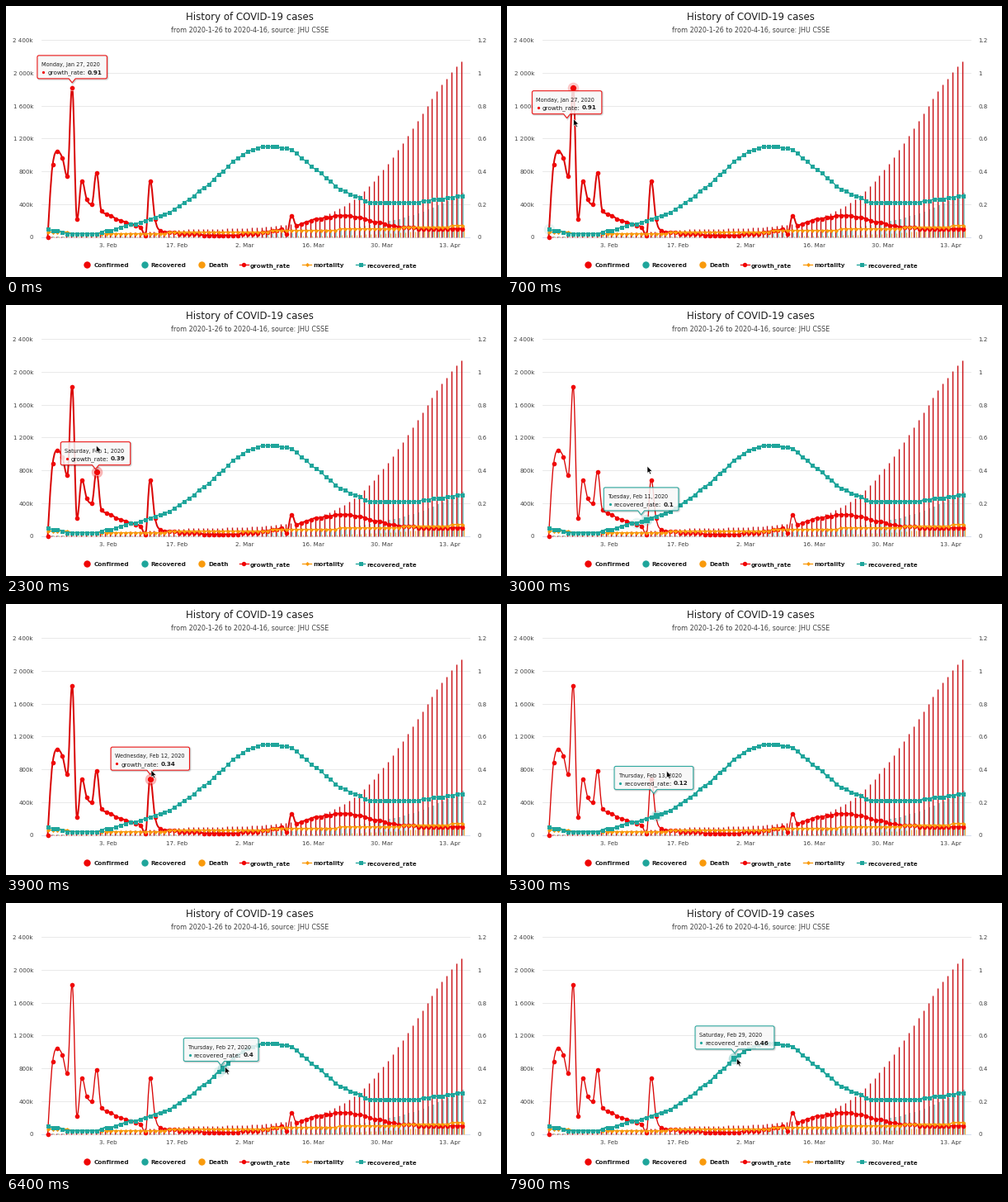
Animation of 600 by 328 pixels, one loop 8 s. Source, as a matplotlib script:

```python
import numpy as np
import matplotlib.pyplot as plt
from matplotlib.animation import FuncAnimation
from matplotlib.patches import PathPatch, Polygon
from matplotlib.path import Path

W, H, DPI = 600, 328, 64
PT = 72 / DPI                      # points per pixel
STEP, COUNT = 100, 80
RED, TEAL, ORANGE = "#f00505", "#1fa59b", "#f99a0c"
plt.rcParams["font.family"] = "DejaVu Sans"

fig = plt.figure(figsize=(W / DPI, H / DPI), dpi=DPI, facecolor="white")
ax = fig.add_axes([0, 0, 1, 1])
ax.set_xlim(0, W)
ax.set_ylim(H, 0)
ax.axis("off")

# ---------- data, one value per day from 22 January ----------
DAYS = np.arange(86)
LEFT, DAY_W = 50.6, 5.912
X = LEFT + DAY_W * DAYS
BASE, UNIT = 279.5, 198.7          # y of zero, pixels per 1.0 (or 2000k)


def ypos(v):
    return BASE - UNIT * np.asarray(v)


def logistic(mid, scale):
    return 1 / (1 + np.exp((mid - DAYS) / scale))


# decaying start, a second hump in late March, and a few outlier days
growth = (.6 * np.exp(-DAYS / 8.3) + .05 * logistic(45, 4)
          + .08 * np.exp(-((DAYS - 60) / 9) ** 2))
for day, value in {0: 0, 1: .44, 2: .52, 3: .48, 5: .91, 6: .11, 7: .34, 10: .39,
                   20: .01, 21: .34, 22: .11, 49: .02, 50: .13}.items():
    growth[day] = value
growth = growth.round(2)

KEYS = [(0, 5), (4, 2), (10, 2), (20, 10), (25, 15), (30, 25), (36, 40), (38, 46),
        (41, 52), (44, 55), (47, 55), (50, 53), (60, 29), (66, 21), (75, 21), (85, 25)]
recovery = np.interp(DAYS, *zip(*KEYS)).round() / 100
mortality = (.02 + .047 * (DAYS / 85) ** 1.8 + .01 * (DAYS < 5)).round(2)

# counts in millions
confirmed = .09 * np.clip(DAYS / 30, 0, 1) + 2.6 * logistic(75.7, 7.1)
recovered = .54 * np.exp((DAYS - 85) / 14.5)
deaths = .142 * np.exp((DAYS - 85) / 13)


# ---------- helpers ----------
def text(x, y, s, size, color="#1c1c1c", ha="center", **kw):
    return ax.text(x, y, s, fontsize=size * PT, color=color, ha=ha,
                   va="center_baseline", **kw)


def spline(x, y):
    """Smooth curve through the points without overshoot."""
    verts, codes = [(x[0], y[0])], [Path.MOVETO]
    handle = verts[0]
    for i in range(1, len(x)):
        left = right = (x[i], y[i])
        if i < len(x) - 1:
            lx, ly = (1.5 * x[i] + x[i - 1]) / 2.5, (1.5 * y[i] + y[i - 1]) / 2.5
            rx, ry = (1.5 * x[i] + x[i + 1]) / 2.5, (1.5 * y[i] + y[i + 1]) / 2.5
            shift = (ry - ly) * (rx - x[i]) / (rx - lx) + y[i] - ry
            ly = np.clip(ly + shift, *sorted((y[i - 1], y[i])))
            ry = np.clip(2 * y[i] - ly, *sorted((y[i + 1], y[i])))
            left, right = (lx, 2 * y[i] - ry), (rx, ry)
        verts += [handle, left, (x[i], y[i])]
        codes += [Path.CURVE4] * 3
        handle = right
    return Path(verts, codes)


def series(values, color, marker, size, z, line_color=None):
    y = ypos(values)
    line = PathPatch(spline(X, y), fc="none", ec=line_color or color, lw=1.33 * PT,
                     capstyle="round", joinstyle="round", zorder=z)
    ax.add_patch(line)
    ax.plot(X, y, marker, color=color, ms=size * PT, mew=0, zorder=z + .1)
    return line


def bars(values, dx, color, w):
    ax.vlines(X + dx, BASE, ypos(values / 2), color=color, lw=w * PT, zorder=2)


# ---------- static chart ----------
text(295.5, 12.5, "History of COVID-19 cases", 11.8)
text(295.5, 28.5, "from 2020-1-26 to 2020-4-16, source: JHU CSSE", 8.05, "#404040")

for i in range(7):
    y = ypos(.2 * i)
    ax.plot([43, 562], [y, y], color="#ccd6eb" if i == 0 else "#e4e4e4",
            lw=.8 * PT, zorder=1)
    count = f"{400 * i:,}k".replace(",", " ") if i else "0"
    text(33, y + .5, count, 7.1, "#404040", "right")
    text(571, y + .5, f"{round(.2 * i, 1):g}", 7.1, "#404040", "left")
for i, label in enumerate(["3. Feb", "17. Feb", "2. Mar", "16. Mar", "30. Mar", "13. Apr"]):
    text(124 + 82.8 * i, 289.5, label, 7.1, "#404040")

bars(recovered, .4, "#8ccbc8", 1.8)
bars(confirmed, -1.2, "#c90d12", 1.4)
bars(deaths, 1.5, "#f7b04a", 1.2)

lines = {"growth_rate": series(growth, RED, "o", 5.6, 3, "#d90606")}
series(mortality, ORANGE, "D", 3.6, 4)
lines["recovered_rate"] = series(recovery, TEAL, "s", 5, 5)

for x, label, color in [(98, "Confirmed", RED), (167.5, "Recovered", TEAL),
                        (237, "Death", ORANGE)]:
    ax.plot(x, 313, "o", color=color, ms=8.4 * PT, mew=0)
    text(x + 8.2, 313.5, label, 7.3, ha="left", weight="bold")
for x, label, color, marker, size in [(288, "growth_rate", RED, "o", 5.4),
                                      (364.5, "mortality", ORANGE, "D", 3.6),
                                      (429.5, "recovered_rate", TEAL, "s", 5)]:
    ax.plot([x - 5.5, x + 5.5], [313, 313], color=color, lw=1.33 * PT)
    ax.plot(x, 313, marker, color=color, ms=size * PT, mew=0)
    text(x + 8, 313.5, label, 7.1, ha="left", weight="bold")

# ---------- mouse path (ms, x, y); hovering follows from it ----------
MOUSE = [(30, 80, 135), (60, 48, 232), (470, 48, 225), (500, 80.5, 135),
         (1800, 82, 146), (2016, 106.8, 166), (2300, 109.5, 170), (2680, 131, 185),
         (2795, 166, 194), (3000, 170, 195), (3300, 175, 198), (3900, 176, 201),
         (4100, 169, 202), (4700, 174.5, 200), (5100, 174.5, 200), (5300, 193.5, 202),
         (5500, 198, 215), (5800, 228, 216), (6200, 260.5, 203), (6400, 265.5, 198),
         (7050, 314, 174), (7250, 314, 174), (7600, 275, 189), (7900, 278.5, 188)]
LAG, TICK = 110, 10
VALUES = {"growth_rate": growth, "recovered_rate": recovery}
COLORS = {"growth_rate": RED, "recovered_rate": TEAL}


def mouse(t):
    times, xs, ys = zip(*MOUSE)
    return np.array([np.interp(t, times, xs), np.interp(t, times, ys)])


def hover(t):
    """Day under the mouse a moment ago, and the series nearest to it."""
    mx, my = mouse(t - LAG)
    d = int(np.clip(round((mx - LEFT) / DAY_W), 0, 85))
    return min(VALUES, key=lambda n: abs(ypos(VALUES[n][d]) - my)), d


def point(name, d):
    return np.array([X[d], ypos(VALUES[name][d])])


# the tooltip closes 1/3 of its gap to the hovered point every 32 ms
anchors = [point(*hover(0))]
for t in range(TICK, STEP * COUNT, TICK):
    goal = point(*hover(t))
    anchors.append(goal + (anchors[-1] - goal) * (2 / 3) ** (TICK / 32))


def date_label(d):
    week = "Wednesday Thursday Friday Saturday Sunday Monday Tuesday".split()
    day, month = 22 + d, "Jan"
    for length, following in ((31, "Feb"), (29, "Mar")):
        if day > length:
            day, month = day - length, following
    return f"{week[d % 7]}, {month} {day}, 2020"


def callout(cx, top, w, h=28, r=2, arrow=4):
    l, rt, b = cx - w / 2, cx + w / 2, top + h
    M, L, C = Path.MOVETO, Path.LINETO, Path.CURVE3
    parts = [(M, l + r, top), (L, rt - r, top), (C, rt, top), (C, rt, top + r),
             (L, rt, b - r), (C, rt, b), (C, rt - r, b), (L, cx + arrow, b),
             (L, cx, b + 5), (L, cx - arrow, b), (L, l + r, b), (C, l, b),
             (C, l, b - r), (L, l, top + r), (C, l, top), (C, l + r, top),
             (Path.CLOSEPOLY, l + r, top)]
    return Path([p[1:] for p in parts], [p[0] for p in parts])


# ---------- moving parts ----------
halos = [ax.plot([], [], "o", ms=13.6 * PT, mew=0, alpha=a, zorder=4.5)[0]
         for a in (.22, .1)]
dot = ax.plot([], [], "o", mec="white", mew=.5 * PT, zorder=4.6)[0]
blank = Path([(0, 0), (1, 1)])
shadows = [PathPatch(blank, fc="none", ec="black", alpha=a, lw=w * PT, zorder=7)
           for w, a in ((3.3, .05), (2, .08), (.8, .12))]
box = PathPatch(blank, fc=(.97, .97, .97, .85), lw=PT, zorder=8)
for patch in shadows + [box]:
    ax.add_patch(patch)
head = text(0, 0, "", 6.5, ha="left", zorder=9)
name_text = text(0, 0, "", 7.2, ha="left", zorder=9)
value_text = text(0, 0, "", 7.2, ha="left", weight="bold", zorder=9)
bullet = ax.plot([], [], "o", ms=3.2 * PT, mew=0, zorder=9)[0]
ARROW = np.array([(0, 0), (0, 8.6), (1.9, 6.9), (3.3, 10), (4.7, 9.4), (3.4, 6.4), (6, 6.2)])
pointer = Polygon(ARROW, fc="black", ec="white", lw=.6 * PT, zorder=10)
ax.add_patch(pointer)


def width(artist):
    return artist.get_window_extent().width * W / fig.bbox.width


def draw(frame):
    t = frame * STEP
    name, d = hover(t)
    color = COLORS[name]
    for key, line in lines.items():
        line.set_linewidth((2 if key == name else 1.33) * PT)

    for halo, age in zip(halos, (0, 120)):
        seen = hover(t - age)
        halo.set_data(*point(*seen)[:, None])
        halo.set(color=COLORS[seen[0]], visible=frame > 0)
    dot.set_data(*point(name, d)[:, None])
    dot.set(marker="o" if color == RED else "s", markerfacecolor=color,
            markersize=(8 if frame else 6) * PT)

    cx, cy = anchors[t // TICK]
    top = cy - 38.8
    head.set_text(date_label(d))
    name_text.set_text(f"{name}:")
    value_text.set_text(f"{VALUES[name][d]:g}")
    value_x = 14.6 + width(name_text)
    w = 6 + max(5 + width(head), value_x + width(value_text))
    left = cx - w / 2
    head.set_position((left + 5, top + 10.8))
    name_text.set_position((left + 12.4, top + 20.3))
    value_text.set_position((left + value_x, top + 20.3))
    bullet.set_data([left + 7.3], [top + 20.3])
    bullet.set_color(color)
    box.set_path(callout(cx, top, w))
    box.set_edgecolor(color)
    for s in shadows:
        s.set_path(callout(cx + .8, top + .8, w))

    pointer.set_visible(frame > 0)
    pointer.set_xy(ARROW + mouse(t))
    return []


anim = FuncAnimation(fig, draw, frames=COUNT, interval=STEP, repeat=True, repeat_delay=0)
plt.show()
```
